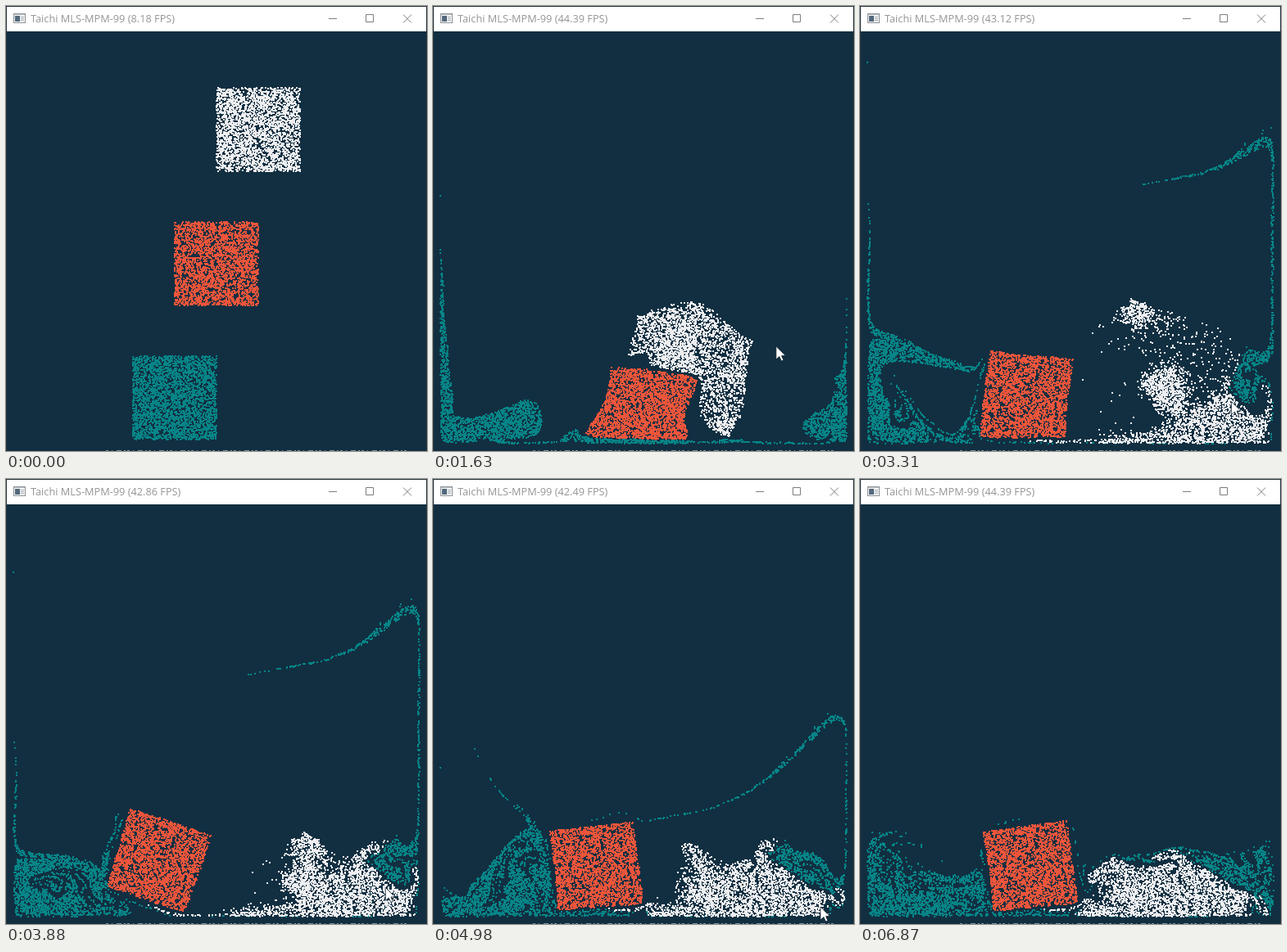
Recreate the animation shown at these times as an HTML page with a canvas. Size 514x544 px, loop 6.94 s.

```html
<!DOCTYPE html>
<html lang="en">
<head>
<meta charset="utf-8">
<title>Taichi MLS-MPM-99</title>
<style>
  html, body { margin: 0; width: 100%; height: 100%; overflow: hidden; background: #112f41; }
  canvas, svg { position: absolute; left: 0; top: 0; display: block; }
  text { font: 12.75px "Open Sans", "Noto Sans", sans-serif; fill: #959595; }
</style>
</head>
<body>
<canvas id="stage" width="514" height="544"></canvas>
<svg width="514" height="544" viewBox="0 0 514 544" fill="none">
  <rect x="1" y="1" width="512" height="30" fill="#fff"/>
  <path d="M0 .5H514M.5 0V544M513.5 0V544" stroke="#26343d"/>
  <path d="M122 543.5H490" stroke="#81919a" stroke-dasharray="3 4 1 5 6 3 2 2"/>
  <rect x="9.5" y="9.5" width="14" height="11" fill="#f4f4f4" stroke="#8d9296"/>
  <path d="M10 10.5H23" stroke="#b9c0c6"/>
  <rect x="11" y="12" width="6" height="7" fill="#52687c"/>
  <path d="M18 13.5H22M18 15.5H22M18 17.5H22" stroke="#a9b0b6"/>
  <text id="title" x="30" y="20"></text>
  <path d="M394 15.5H404M439.5 10.5H448.5V19.5H439.5ZM485 10.5L495 20.5M495 10.5L485 20.5" stroke="#7d7d7d"/>
  <path id="cursor" d="M0 0V16L4 12.5L6.5 18L9 17L6.7 11.5H11.5Z" fill="#fff" stroke="#14222c" stroke-width=".8"/>
</svg>
<script>
const begin = performance.now();
const LOOP = 6940, FRAMES = 100, STEP = LOOP / FRAMES;
const ctx = document.getElementById("stage").getContext("2d");
const title = document.getElementById("title");
const cursor = document.getElementById("cursor");

// The world is a unit square; positions and speeds below are in grid cells.
const WATER = 0, JELLY = 1, SNOW = 2;
const COLORS = ["#068587", "#ed553b", "#eeeef0"];
const COUNT = 3000, TOTAL = COUNT * COLORS.length;
const WALL = 1 / 64, LOW = 2, CELLS = 78, HIGH = LOW + CELLS, SIZE = HIGH + 3;
const SCALE = CELLS / (1 - 2 * WALL);
const SUBSTEPS = 34, DT = 0.0055 / SUBSTEPS;
const GRAVITY = 50, FALLEN = 0.0314;
const YOUNG = 1000, POISSON = 0.2;
const MU = YOUNG / (2 * (1 + POISSON));
const LAMBDA = YOUNG * POISSON / ((1 + POISSON) * (1 - 2 * POISSON));

const field = n => new Float64Array(n);
const [x, y, vx, vy, c00, c01, c10, c11, f00, f01, f10, f11, plastic, hardness] =
  Array.from({ length: 14 }, () => field(TOTAL));
const [mass, gx, gy] = Array.from({ length: 3 }, () => field(SIZE * SIZE));
const wx = field(3), wy = field(3);
const clamp = (v, lo, hi) => v < lo ? lo : v > hi ? hi : v;
const toGrid = v => (v - WALL) * SCALE + LOW;
const toWorld = v => (v - LOW) / SCALE + WALL;

let seed = 99;
function random() {
  seed = (Math.imul(seed, 1664525) + 1013904223) >>> 0;
  return seed / 4294967296;
}

// Three blocks that have already been in free fall for a moment.
for (let p = 0; p < TOTAL; p++) {
  const kind = Math.floor(p / COUNT);
  x[p] = toGrid(0.3 + 0.1 * kind + 0.2 * random());
  y[p] = toGrid(0.05 + 0.32 * kind + 0.2 * random() - GRAVITY * FALLEN ** 2 / 2);
  vy[p] = -GRAVITY * FALLEN * SCALE;
  f00[p] = f11[p] = plastic[p] = 1;
  hardness[p] = kind === JELLY ? 0.3 : 1;
}

// Quadratic spline weights; returns the index of the lowest node touched.
function locate(p) {
  const i = Math.floor(x[p] - 0.5), j = Math.floor(y[p] - 0.5);
  const fx = x[p] - i, fy = y[p] - j;
  wx[0] = 0.5 * (1.5 - fx) * (1.5 - fx);
  wx[1] = 0.75 - (fx - 1) * (fx - 1);
  wx[2] = 0.5 * (fx - 0.5) * (fx - 0.5);
  wy[0] = 0.5 * (1.5 - fy) * (1.5 - fy);
  wy[1] = 0.75 - (fy - 1) * (fy - 1);
  wy[2] = 0.5 * (fy - 0.5) * (fy - 0.5);
  return i * SIZE + j;
}

function scatter() {
  const force = -4 * DT * SCALE * SCALE;
  for (let p = 0; p < TOTAL; p++) {
    const kind = Math.floor(p / COUNT);
    const a = 1 + DT * c00[p], b = DT * c01[p], c = DT * c10[p], d = 1 + DT * c11[p];
    let s00, s01 = 0, s11;
    if (kind === WATER) {
      // Water only remembers its volume, kept in f00.
      const volume = f00[p] *= a * d - b * c;
      s00 = s11 = LAMBDA * volume * (volume - 1);
    } else {
      let p00 = a * f00[p] + b * f10[p], p01 = a * f01[p] + b * f11[p];
      let p10 = c * f00[p] + d * f10[p], p11 = c * f01[p] + d * f11[p];
      const rx = p00 + p11, ry = p10 - p01, length = Math.sqrt(rx * rx + ry * ry) || 1;
      const cos = rx / length, sin = ry / length;

      if (kind === SNOW) {
        const t00 = cos * p00 + sin * p10, t01 = cos * p01 + sin * p11, t11 = cos * p11 - sin * p01;
        const mid = (t00 + t11) / 2, half = (t00 - t11) / 2;
        const radius = Math.sqrt(half * half + t01 * t01);
        const big = clamp(mid + radius, 0.975, 1.0045), small = clamp(mid - radius, 0.975, 1.0045);
        if (big !== mid + radius || small !== mid - radius) {
          plastic[p] *= (mid * mid - radius * radius) / (big * small);
          hardness[p] = Math.min(8, Math.exp(10 * (1 - plastic[p])));
          const k = radius > 1e-12 ? (big - small) / (2 * radius) : 0;
          const m = (big + small) / 2, n00 = m + k * half, n01 = k * t01, n11 = m - k * half;
          p00 = cos * n00 - sin * n01;
          p01 = cos * n01 - sin * n11;
          p10 = sin * n00 + cos * n01;
          p11 = sin * n01 + cos * n11;
        }
      }
      f00[p] = p00; f01[p] = p01; f10[p] = p10; f11[p] = p11;

      const volume = p00 * p11 - p01 * p10;
      const shear = 2 * MU * hardness[p], press = LAMBDA * hardness[p] * volume * (volume - 1);
      const e00 = p00 - cos, e01 = p01 + sin, e10 = p10 - sin, e11 = p11 - cos;
      s00 = shear * (e00 * p00 + e01 * p01) + press;
      s01 = shear * (e00 * p10 + e01 * p11);
      s11 = shear * (e10 * p10 + e11 * p11) + press;
    }
    const a00 = force * s00 + c00[p], a01 = force * s01 + c01[p];
    const a10 = force * s01 + c10[p], a11 = force * s11 + c11[p];
    const base = locate(p);
    const fx = x[p] - Math.floor(x[p] - 0.5), fy = y[p] - Math.floor(y[p] - 0.5);
    for (let i = 0; i < 3; i++) {
      const dx = i - fx;
      for (let j = 0; j < 3; j++) {
        const dy = j - fy, w = wx[i] * wy[j], node = base + i * SIZE + j;
        mass[node] += w;
        gx[node] += w * (vx[p] + a00 * dx + a01 * dy);
        gy[node] += w * (vy[p] + a10 * dx + a11 * dy);
      }
    }
  }
}

function updateGrid() {
  for (let i = 0; i < SIZE; i++) {
    for (let j = 0; j < SIZE; j++) {
      const node = i * SIZE + j;
      if (mass[node] === 0) continue;
      gx[node] /= mass[node];
      gy[node] = gy[node] / mass[node] - DT * GRAVITY * SCALE;
      if (i <= LOW && gx[node] < 0 || i >= HIGH && gx[node] > 0) gx[node] = 0;
      if (j <= LOW && gy[node] < 0 || j >= HIGH && gy[node] > 0) gy[node] = 0;
    }
  }
}

function gather() {
  for (let p = 0; p < TOTAL; p++) {
    const base = locate(p);
    const fx = x[p] - Math.floor(x[p] - 0.5), fy = y[p] - Math.floor(y[p] - 0.5);
    let u = 0, v = 0, ux = 0, uy = 0, vX = 0, vY = 0;
    for (let i = 0; i < 3; i++) {
      const dx = i - fx;
      for (let j = 0; j < 3; j++) {
        const dy = j - fy, w = wx[i] * wy[j], node = base + i * SIZE + j;
        const wu = w * gx[node], wv = w * gy[node];
        u += wu; v += wv;
        ux += wu * dx; uy += wu * dy;
        vX += wv * dx; vY += wv * dy;
      }
    }
    vx[p] = u; vy[p] = v;
    c00[p] = 4 * ux; c01[p] = 4 * uy; c10[p] = 4 * vX; c11[p] = 4 * vY;
    x[p] = clamp(x[p] + DT * u, 1, HIGH + 1);
    y[p] = clamp(y[p] + DT * v, 1, HIGH + 1);
  }
}

function substep() {
  mass.fill(0);
  gx.fill(0);
  gy.fill(0);
  scatter();
  updateGrid();
  gather();
}

// Every picture is simulated once and then kept for the following loops.
const pictures = [];
function record() {
  const dots = new Int16Array(TOTAL * 2);
  for (let p = 0; p < TOTAL; p++) {
    dots[2 * p] = Math.round(1 + 512 * toWorld(x[p])) - 1;
    dots[2 * p + 1] = Math.round(543 - 512 * toWorld(y[p])) - 1;
  }
  pictures.push(dots);
}
function simulateTo(index) {
  while (pictures.length <= Math.min(index, FRAMES - 1)) {
    if (pictures.length) for (let s = 0; s < SUBSTEPS; s++) substep();
    record();
  }
}

function drawGrains(dots) {
  ctx.fillStyle = "#112f41";
  ctx.fillRect(0, 0, 514, 544);
  for (let p = 0; p < TOTAL; p++) {
    if (p % COUNT === 0) ctx.fillStyle = COLORS[p / COUNT];
    ctx.fillRect(dots[2 * p], dots[2 * p + 1], 2, 2);
  }
}

function frameRate(time) {
  const slot = Math.floor(time / 230);
  return (slot ? 43.4 + Math.sin(slot * 4 * Math.PI / 11) : 8.18).toFixed(2);
}

const cursorPath = [[500, 471, 545], [1630, 417, 413], [2610, 469, 497], [3310, 453, 483],
  [4430, 473, 515], [5620, 473, 532], [5880, 473, 546]];
function moveCursor(time) {
  const i = cursorPath.findIndex(key => key[0] > time);
  cursor.style.display = i > 0 ? "" : "none";
  if (i < 1) return;
  const [t0, x0, y0] = cursorPath[i - 1], [t1, x1, y1] = cursorPath[i];
  const f = (time - t0) / (t1 - t0);
  cursor.setAttribute("transform", `translate(${x0 + (x1 - x0) * f} ${y0 + (y1 - y0) * f})`);
}

let shown = -1;
function draw(time) {
  const step = Math.min(FRAMES - 1, Math.round(time / STEP));
  if (step === shown) return;
  shown = step;
  simulateTo(step);
  drawGrains(pictures[step]);
  title.textContent = `Taichi MLS-MPM-99 (${frameRate(step * STEP)} FPS)`;
  moveCursor(step * STEP);
  simulateTo(step + 1);
}

function tick() {
  draw((performance.now() - begin) % LOOP);
  requestAnimationFrame(tick);
}
tick();
</script>
</body>
</html>
```
